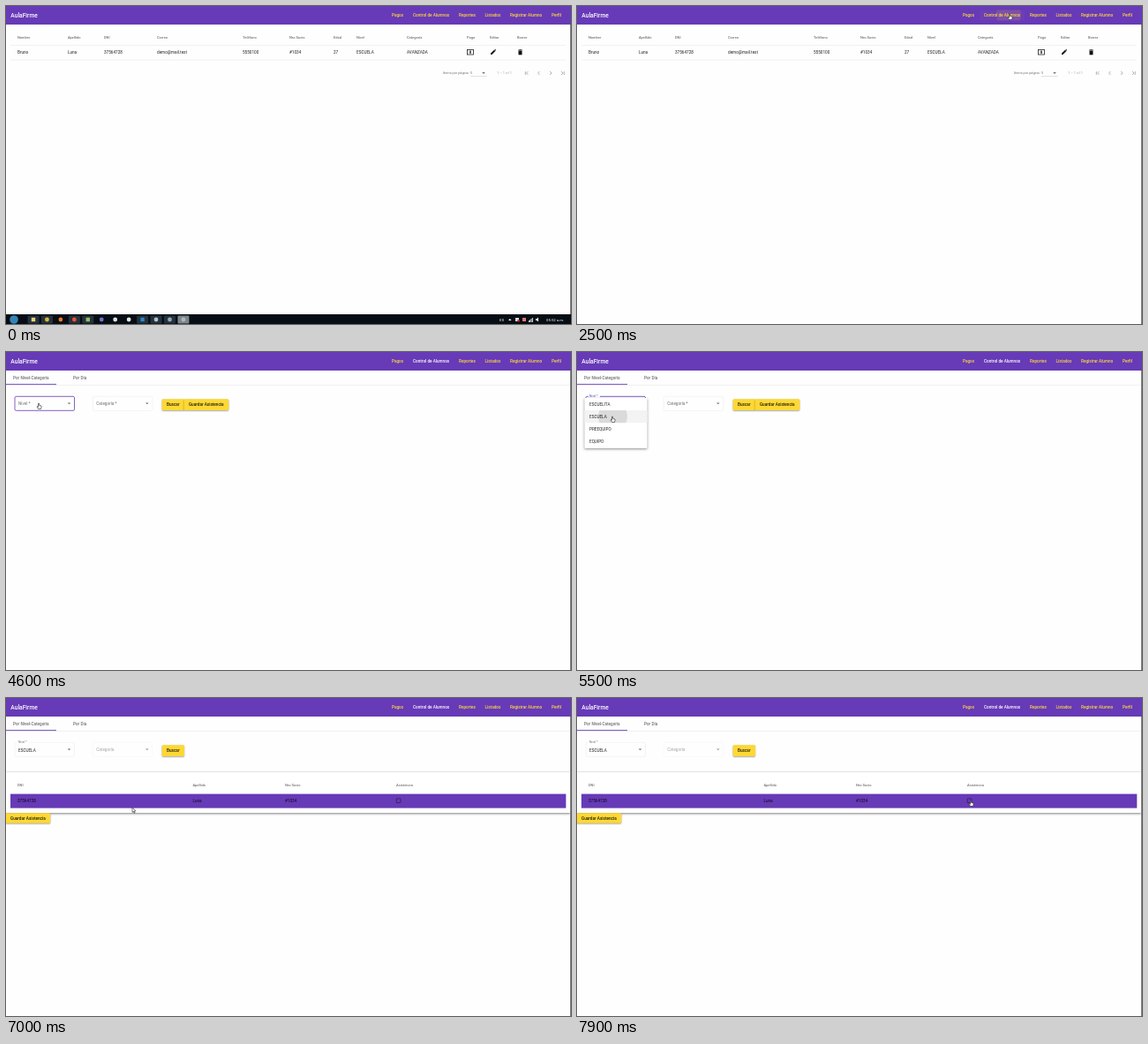
An HTML page with a canvas for the animation above (8000 ms loop, 640 px wide and 360 px high).

```html
<!DOCTYPE html>
<html lang="es">
<head>
<meta charset="utf-8">
<title>AulaFirme</title>
<style>
html, body { margin: 0; width: 100%; height: 100%; overflow: hidden; background: #fff; }
canvas { display: block; width: 640px; height: 360px; }
</style>
</head>
<body>
<canvas id="stage" width="640" height="360"></canvas>
<script>
const ctx = document.getElementById('stage').getContext('2d');
const LOOP = 8000, STEP = 100;
const PURPLE = '#673ab7', YELLOW = '#fdd835', INK = 'rgba(0,0,0,.87)', SOFT = 'rgba(0,0,0,.56)';
const LINE = 'rgba(0,0,0,.1)';

// Moments of the interaction, in ms
const AT = { barOut: 100, press: 2300, page: 2700, focus: 4500, open: 4800, ripple: 5300,
             pick: 5800, search: 6200, table: 6300 };

// Pointer stops: time, x, y
const PATH = [[200, 201, 350], [900, 583, 48], [1200, 583, 48], [2000, 476, 13], [2400, 490, 9],
  [3000, 490, 9], [3700, 238, 32], [3900, 238, 32], [4500, 37, 58], [4900, 37, 58],
  [5400, 40, 73], [5700, 40, 73], [6200, 183, 59], [6500, 183, 59], [7000, 143, 124],
  [7500, 143, 124], [7800, 446, 116]];

const clamp = v => Math.max(0, Math.min(1, v));
const ease = v => v * v * (3 - 2 * v);

function pointer(t) {
  const n = PATH.findIndex(p => p[0] > t);
  if (n < 0) return PATH[PATH.length - 1].slice(1);
  if (n === 0) return null;
  const [t0, x0, y0] = PATH[n - 1], [t1, x1, y1] = PATH[n];
  const k = ease((t - t0) / (t1 - t0));
  return [x0 + (x1 - x0) * k, y0 + (y1 - y0) * k];
}

function box(x, y, w, h, color) {
  ctx.fillStyle = color;
  ctx.fillRect(x, y, w, h);
}

function round(x, y, w, h, r) {
  ctx.beginPath();
  ctx.roundRect(x, y, w, h, r);
}

function dot(x, y, r, color) {
  ctx.fillStyle = color;
  ctx.beginPath();
  ctx.arc(x, y, r, 0, 7);
  ctx.fill();
}

// Sizes are those of a 1920 px wide page, shown at one third; y is the middle of the capitals
function text(s, x, y, size = 14, color = INK, weight = 400) {
  const px = size / 3;
  ctx.font = `${weight} ${px}px Roboto, Arial, sans-serif`;
  ctx.fillStyle = color;
  ctx.fillText(s, x, y + px * .36);
}

function poly(points, color) {
  ctx.fillStyle = color;
  ctx.beginPath();
  for (let i = 0; i < points.length; i += 2) ctx.lineTo(points[i], points[i + 1]);
  ctx.closePath();
  ctx.fill();
}

function shadowed(blur, dy, alpha, draw) {
  ctx.save();
  ctx.shadowColor = `rgba(0,0,0,${alpha})`;
  ctx.shadowBlur = blur;
  ctx.shadowOffsetY = dy;
  draw();
  ctx.restore();
}

const arrowDown = (x, y, color) => poly([x - 1.8, y - .9, x + 1.8, y - .9, x, y + .9], color);

function navBar(t) {
  box(0, 0, 640, 21, PURPLE);
  text('AulaFirme', 5.3, 10.8, 20, '#fff', 500);
  const active = t >= AT.page;
  if (t >= 2000 && !active) {
    round(456, 4.6, 51, 12, 1.3);
    ctx.fillStyle = 'rgba(255,215,64,.03)';
    ctx.fill();
    if (t >= AT.press) {
      ctx.save();
      ctx.clip();
      dot(489, 10, 14 * clamp((t - AT.press) / 200), 'rgba(255,215,64,.12)');
      ctx.restore();
    }
  }
  const items = [['Pagos', 437], ['Control de Alumnos', 461], ['Reportes', 513], ['Listados', 542.5],
    ['Registrar Alumno', 571], ['Perfil', 618]];
  items.forEach(([s, x], i) => text(s, x, 10.8, 14, active && i === 1 ? '#fff' : '#ffd740', 500));
}

function moneyIcon(x, y) {
  ctx.strokeStyle = '#222';
  ctx.lineWidth = .8;
  ctx.strokeRect(x - 3.5, y - 2.6, 7, 5.6);
  box(x - .8, y - 1.4, 1.6, 3.2, '#333');
}

function pencilIcon(x, y) {
  poly([x - 3, y + 3, x - 3, y + 1.6, x + 1, y - 2.3, x + 2.4, y - .9, x - 1.6, y + 3], '#111');
  poly([x + 1.4, y - 2.7, x + 2, y - 3.2, x + 3.2, y - 2, x + 2.8, y - 1.3], '#111');
}

function binIcon(x, y) {
  box(x - 2, y - 1.7, 4, 4.7, '#111');
  box(x - 2.4, y - 2.7, 4.8, .7, '#111');
  box(x - .9, y - 3.1, 1.8, .6, '#111');
}

function chevron(x, y, dir, bar, color) {
  ctx.strokeStyle = color;
  ctx.lineWidth = .7;
  ctx.beginPath();
  ctx.moveTo(x - dir, y - 2);
  ctx.lineTo(x + dir, y);
  ctx.lineTo(x - dir, y + 2);
  if (bar) {
    ctx.moveTo(x + dir * 2.2, y - 2);
    ctx.lineTo(x + dir * 2.2, y + 2);
  }
  ctx.stroke();
}

function studentList() {
  const cols = [['Nombre', 'Bruno', 13], ['Apellido', 'Luna', 70], ['DNI', '37564728', 111],
    ['Correo', 'demo@mail.test', 171], ['Teléfono', '5550100', 268], ['Nro Socio', '#1034', 321],
    ['Edad', '27', 371], ['Nivel', 'ESCUELA', 397], ['Categoría', 'AVANZADA', 454],
    ['Pago', '', 522], ['Editar', '', 548], ['Borrar', '', 579]];
  for (const [head, cell, x] of cols) {
    text(head, x, 35.6, 12, SOFT, 500);
    text(cell, x, 52.7);
  }
  box(5, 44.3, 629, .5, LINE);
  box(5, 60.8, 629, .5, LINE);
  moneyIcon(526, 52);
  pencilIcon(552, 52);
  binIcon(582.5, 52.3);

  text('Items por página:', 495, 76, 11.5, SOFT);
  text('5', 526, 76, 12, SOFT);
  arrowDown(541, 76, SOFT);
  box(526, 79.6, 18.5, .4, 'rgba(0,0,0,.3)');
  text('1 – 1 of 1', 556, 76, 12, 'rgba(0,0,0,.36)');
  const grey = 'rgba(0,0,0,.42)';
  chevron(590.5, 76, -1, true, grey);
  chevron(603.5, 76, -1, false, grey);
  chevron(617, 76, 1, false, grey);
  chevron(630, 76, 1, true, grey);
}

function field(x, label, value, focus, dim, floated) {
  const tone = focus ? PURPLE : dim ? 'rgba(0,0,0,.05)' : 'rgba(0,0,0,.09)';
  round(x, 50.3, 67.5, 16, 1.5);
  ctx.strokeStyle = tone;
  ctx.lineWidth = focus ? .8 : .5;
  ctx.stroke();
  if (floated) {
    box(x + 3, 49, 13, 2.5, '#fff');
    text(label, x + 4, 50, 10, focus ? PURPLE : SOFT);
  } else {
    text(label, x + 4, 58, 14, dim ? 'rgba(0,0,0,.34)' : SOFT);
  }
  text(value, x + 4, 59);
  arrowDown(x + 61.5, 58.3, dim ? 'rgba(0,0,0,.4)' : SOFT);
}

function button(x, y, w, h, label, pad) {
  shadowed(1.6, .8, .4, () => {
    round(x, y, w, h, 1.3);
    ctx.fillStyle = YELLOW;
    ctx.fill();
  });
  text(label, x + pad, y + h / 2, 14, INK, 500);
}

function levelMenu(t, y) {
  const grow = .8 + .2 * clamp((t - AT.open + 100) / 200);
  ctx.save();
  ctx.translate(8.5, 52);
  ctx.scale(1, grow);
  ctx.translate(-8.5, -52);
  shadowed(3, 1, .45, () => {
    round(8.5, 52, 71, 57, 1.3);
    ctx.fillStyle = '#fff';
    ctx.fill();
  });
  ['ESCUELITA', 'ESCUELA', 'PREEQUIPO', 'EQUIPO'].forEach((s, i) => {
    const top = 52 + i * 14.1;
    if (y >= top && y < top + 14.1) box(8.5, top, 71, 14.1, '#f3f3f3');
    if (i === 1 && t >= AT.ripple) {
      const r = 16.5 * clamp((t - AT.ripple) / 200);
      ctx.save();
      ctx.beginPath();
      ctx.rect(8.5, top, 71, 14.1);
      ctx.clip();
      dot(40.5, 73, r, 'rgba(0,0,0,.1)');
      ctx.restore();
    }
    text(s, 14, top + 7);
  });
  ctx.restore();
}

function attendance(t, pos) {
  text('Por Nivel-Categoria', 8, 29.3, 14, SOFT, 500);
  text('Por Día', 76, 29.3, 14, SOFT, 500);
  box(0, 37, 639, .5, LINE);
  box(0, 36.2, 57, .9, PURPLE);

  const picked = t >= AT.pick, found = t >= AT.table;
  const focus = t >= AT.focus && t < AT.pick;
  field(10, 'Nivel *', picked ? 'ESCUELA' : '', focus, false, picked || t >= AT.open);
  field(98.3, found ? 'Categoría' : 'Categoría *', '', false, found, false);

  button(176.7, 53.3, 25.3, 12.7, 'Buscar', 5.3);
  if (!found) button(201.6, 53.3, 50.6, 12.7, 'Guardar Asistencia', 5.3);
  if (t >= AT.search && t < 6700) {
    round(176.7, 53.3, 25.3, 12.7, 1.3);
    ctx.fillStyle = 'rgba(150,80,0,.16)';
    ctx.fill();
  }
  if (found) results(pos);
  if (t >= AT.open && t < AT.pick) levelMenu(t, pos[1]);
}

function results(pos) {
  shadowed(2.5, 1, .5, () => box(0, 84, 639, 46, '#fff'));
  box(0, 83.6, 639, .5, LINE);
  const hot = pos[1] >= 108.5 && pos[1] < 124.6;
  if (hot) box(5, 108.6, 629.3, 16, PURPLE);
  else box(5, 108.2, 629, .5, LINE);
  box(5, 124.3, 629, .4, LINE);
  const cols = [['DNI', '37564728', 13], ['Apellido', 'Luna', 211.5], ['Nro Socio', '#1034', 316],
    ['Asistencia', '', 442]];
  for (const [head, cell, x] of cols) {
    text(head, x, 99, 12, SOFT, 500);
    text(cell, x, 116);
  }
  ctx.strokeStyle = 'rgba(0,0,0,.6)';
  ctx.lineWidth = .7;
  round(442.3, 113.9, 4.6, 4.6, .5);
  ctx.stroke();
  button(-1, 130.2, 51.2, 11.5, 'Guardar Asistencia', 6);
}

function taskBar(t) {
  const y = 350 + 11 * clamp((t - AT.barOut) / 200);
  if (y >= 361) return;
  ctx.save();
  ctx.translate(0, y);
  box(0, -1, 640, 11, '#060d14');
  dot(9, 5, 4.8, '#3484b5');
  const tints = ['#e4cf82', '#d9b83e', '#f0752c', '#ef5030', '#91bc66', '#6976c6', '#e3dce2',
    '#e4e6e6', '#2587cc', '#b6bdc4', '#8eaaba', '#aeb7bd'];
  tints.forEach((c, i) => {
    const x = 31 + i * 15.45;
    if (i < 2 || i === 3 || i === 4 || i > 7) {
      round(x - 6.5, .5, 13, 9, 1);
      ctx.fillStyle = i === 11 ? '#7d868b' : '#26323b';
      ctx.fill();
    }
    if (i % 4 === 0) box(x - 2.2, 2.8, 4.4, 4.4, c);
    else dot(x, 5, 2.4, c);
  });
  text('ES', 559, 5, 13, '#fff');
  poly([569, 6, 572.6, 6, 570.8, 3.9], '#fff');
  box(577, 3, 4, 4, '#d9dadc');
  dot(580.5, 6.2, 1.3, '#d33');
  box(585, 3, 4, 4, '#d77c70');
  for (let i = 0; i < 4; i++) box(592 + i * 1.3, 6 - i, .9, 2 + i, '#eee');
  poly([600, 4, 601.5, 4, 603, 2.6, 603, 7.4, 601.5, 6, 600, 6], '#fff');
  text('05:52 a.m.', 612, 5, 13, '#fff');
  ctx.restore();
}

function outline(points, x, y) {
  ctx.beginPath();
  for (let i = 0; i < points.length; i += 2) ctx.lineTo(x + points[i], y + points[i + 1]);
  ctx.closePath();
  ctx.fillStyle = '#fff';
  ctx.strokeStyle = '#222';
  ctx.lineWidth = .6;
  ctx.fill();
  ctx.stroke();
}

const ARROW = [0, 0, 0, 5.4, 1.3, 4.3, 2.2, 6.3, 3.1, 5.9, 2.2, 4, 3.9, 3.9];
const HAND = [-.5, .2, .5, .2, .6, 2.4, 2.8, 2.9, 3.2, 4, 2.5, 6.5, -.4, 6.5, -2, 4, -1.5, 3.5, -.5, 4.3];

function drawPointer(t, [x, y]) {
  const hand = (t >= 2000 && t < 3100) || (t >= 4500 && t < 5700) ||
    (t >= 6100 && t < 6600) || t >= 7800;
  outline(hand ? HAND : ARROW, x, y);
}

function frame() {
  const t = Math.floor(performance.now() % LOOP / STEP) * STEP;
  const pos = pointer(t);
  box(0, 0, 640, 360, '#fefefe');
  if (t < AT.page) studentList();
  else attendance(t, pos);
  box(639, 0, 1, 360, '#777');
  navBar(t);
  taskBar(t);
  if (pos) drawPointer(t, pos);
  requestAnimationFrame(frame);
}
frame();
</script>
</body>
</html>
```
